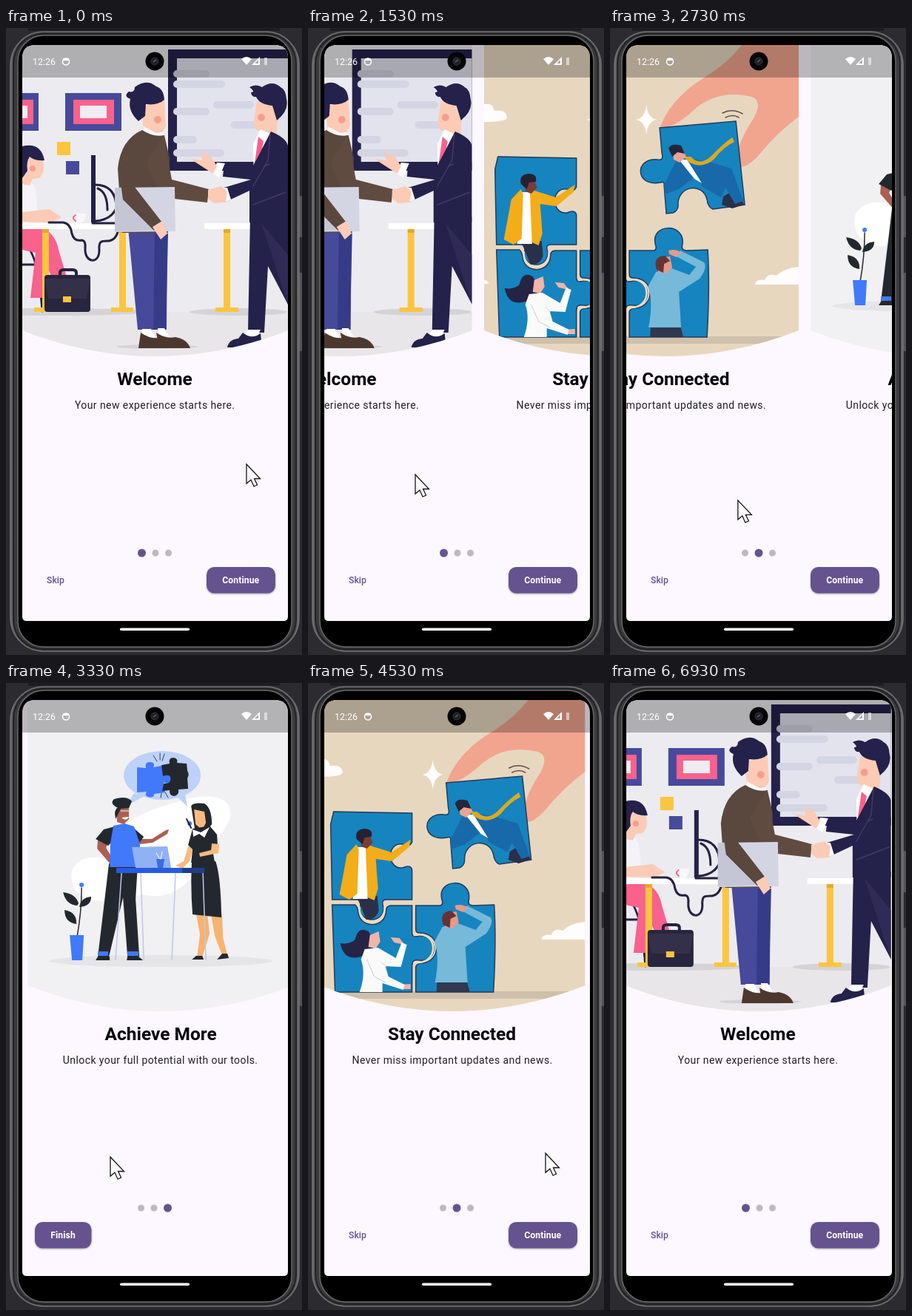
An HTML page that plays this animation: 400x848 px, repeating every 7 s.

```html
<!DOCTYPE html>
<html lang="en">
<head>
<meta charset="utf-8">
<title>Onboarding</title>
<style>
html, body { margin: 0; width: 100%; height: 100%; overflow: hidden; background: #2c2b30; }
svg { display: block; width: 100vw; height: 100vh; }
text { font-family: Roboto, Arial, sans-serif; }
.title { font-size: 24.45px; font-weight: 700; text-anchor: middle; fill: #050308; }
.body { font-size: 13.97px; letter-spacing: .44px; text-anchor: middle; fill: #211f26; }
.label { font-size: 12.2px; font-weight: 700; letter-spacing: .09px; text-anchor: middle; fill: #fff; }
.btn { fill: #65538f; filter: drop-shadow(0 1px 1px #0005); }
.navy { fill: #24214a; }
.skin { fill: #fbcbb6; }
.gold { fill: #fbc540; }
.blue { fill: #474a9a; }
.pink { fill: #f8628c; }
.piece { fill: #1684be; stroke: #203c5c; stroke-width: 1.5; }
.ink { fill: #23282f; }
.azure { fill: #4079fa; }
.line { fill: none; stroke-linecap: round; stroke-linejoin: round; }
</style>
</head>
<body>
<svg viewBox="0 0 400 848" preserveAspectRatio="none">
<defs>
  <clipPath id="screen"><path d="M22 41Q22 23 40 23H363Q381 23 381 41V796Q381 802 375 802H28Q22 802 22 796Z"/></clipPath>
  <clipPath id="curve"><path d="M22 23H381V409Q201.5 479 22 409Z"/></clipPath>
  <linearGradient id="metal"><stop stop-color="#6b6b6d"/><stop offset=".03" stop-color="#373739"/><stop offset=".97" stop-color="#373739"/><stop offset="1" stop-color="#6b6b6d"/></linearGradient>
</defs>

<!-- phone -->
<rect width="400" height="848" fill="#2c2b30"/>
<path d="M30 2H370" stroke="#1b1a1d" stroke-width="3"/>
<rect x="396" y="227" width="5" height="56" rx="2" fill="#555558"/>
<rect x="396" y="331" width="5" height="106" rx="2" fill="#555558"/>
<rect x="6" y="5" width="390" height="838" rx="45" fill="url(#metal)" stroke="#717174" stroke-width="1.5"/>
<rect x="10" y="8" width="382" height="832" rx="40" fill="#3b3b3d" stroke="#222224" stroke-width="2"/>
<rect x="16" y="10" width="370" height="827" rx="35" stroke="#68686a" stroke-width="1.5"/>

<g clip-path="url(#screen)">
  <rect x="22" y="23" width="359" height="779" fill="#fdf7ff"/>

  <!-- welcome -->
  <g class="page">
    <g clip-path="url(#curve)">
      <rect x="22" y="23" width="359" height="430" fill="#ecebef"/>
      <path d="M22 384H381V450H22Z" fill="#e8e6e9"/>
      <g fill="#d5d3d6"><ellipse cx="65" cy="384" rx="125" ry="5"/><ellipse cx="314" cy="384" rx="66" ry="5"/><ellipse cx="204" cy="431" rx="55" ry="3"/><ellipse cx="334" cy="430" rx="38" ry="3"/></g>
      <path class="navy" d="M219 29H390V193H219Z"/>
      <path d="M231 41H390V181H231Z" fill="#e2e3ed"/>
      <path class="line" d="M231 62H270M231 76H291M285 104H330M231 113H270M309 131H345M231 151H253M231 169H290" stroke="#d3d5e3" stroke-width="10"/>
      <path class="blue" d="M22 88H44V139H22ZM80 88H156V139H80Z"/>
      <path class="pink" d="M22 97H37V130H22ZM91 97H146V130H91Z"/>
      <path d="M22 105H29V122H22ZM100 105H136V122H100Z" fill="#efecf2"/>
      <path class="gold" d="M69 154H87V172H69Z"/>
      <path class="blue" d="M81 180H99V198H81Z"/>

      <path d="M22 292Q43 296 49 383M22 320H42" class="line" stroke="#25223f" stroke-width="3"/>
      <path class="pink" d="M22 272H53Q68 282 71 300L83 340 70 354 54 320 49 365H33L40 304 22 300Z"/>
      <path d="M22 205Q36 205 40 219L44 258 22 266Z" fill="#f5f3f8"/>
      <path class="skin" d="M24 172H48Q55 194 45 203L36 204 32 213 22 211ZM22 249L59 245 75 256 61 263 22 262Z"/>
      <circle cx="36" cy="190" r="4" fill="#f69e8e"/>
      <path class="navy" d="M22 160Q47 154 52 179Q38 180 32 174Q27 181 29 193L22 203Z"/>
      <path class="gold" d="M49 271H58V378H69V384H38V378H49ZM153 271H162V378H172V384H142V378H153ZM294 271H303V378H314V384H283V378H294Z"/>
      <path fill="#fff" d="M22 264H150V272H22ZM268 264H335V272H268Z"/>
      <path fill="#e6a72d" d="M49 272H58V277H49ZM153 272H162V277H153ZM294 272H303V277H294Z"/>
      <g class="line" stroke="#25223f" stroke-width="3">
        <path d="M120 212Q149 212 149 244Q141 260 121 261M124 217Q137 222 137 246M117 264H148"/>
        <path d="M58 263H77Q87 264 89 278Q92 289 102 287Q108 287 107 298C106 318 126 320 126 301C125 287 129 288 139 288Q150 286 152 271"/>
      </g>
      <path class="navy" d="M115 172H121V263H115Z"/>
      <path d="M94 251H108Q108 263 100 264H95Z" fill="#f9f7fa"/><path class="line" stroke="#f8628c" stroke-width="2" d="M94 253Q88 257 94 261"/>
      <path class="line" d="M73 336V331Q73 327 78 327H90Q95 327 95 331V336" stroke="#25223f" stroke-width="4"/>
      <rect x="52" y="334" width="62" height="50" rx="4" fill="#28253f"/><path d="M52 339H114L109 366H57Z" fill="#343049"/><path class="gold" d="M77 363H88V371H77Z"/>

      <path class="blue" d="M165 270H218L217 408H178Z"/><path d="M201 278H219L216 408H199Z" fill="#363b87"/>
      <path fill="#fff" d="M184 407H196L202 419 184 416ZM205 406H214L221 418 207 415Z"/>
      <g fill="#4d382f"><path d="M203 412Q216 421 229 418Q245 421 249 433H207Z"/><path d="M182 412Q195 421 207 419Q220 422 222 433H179Z"/></g>
      <path class="skin" d="M183 107L214 98 216 132Q213 142 207 142L208 149 187 151Z"/>
      <circle cx="205" cy="124" r="5" fill="#f69e8e"/>
      <path class="navy" d="M179 126Q164 112 168 96Q158 92 166 86Q174 88 174 80Q190 68 203 79Q213 82 214 97Q205 105 189 103L188 119Z"/>
      <path d="M186 133L203 142 213 141 216 153 185 147Z" fill="#f9f7fa"/>
      <path d="M184 138Q199 148 214 145L221 176 219 277H157L151 190Q155 151 184 138Z" fill="#5a473e"/>
      <path d="M213 145L224 205 274 218 272 236 210 229 190 182Z" fill="#604b41"/>
      <path d="M147 216L228 215 229 275 147 276Z" fill="#d4d5e2"/><path d="M147 216L173 215 199 273 147 275Z" fill="#c5c6d5"/>
      <path d="M152 188Q157 164 175 171L173 214 211 263 200 274 158 232Z" fill="#5a473e"/>
      <path class="skin" d="M198 269L211 261 218 278 209 286Z"/>

      <path class="navy" d="M330 255H381V374L354 322 349 412H327Z"/><path d="M345 264L381 307V374Z" fill="#302b56"/>
      <path d="M327 408H344L339 419H321Z" fill="#fff"/><path class="navy" d="M320 412Q332 422 344 413L346 432H299Q301 421 314 420Z"/>
      <path class="skin" d="M339 99L368 105 365 151 346 147V140Q334 139 335 127Z"/>
      <circle cx="345" cy="121" r="5" fill="#f69e8e"/>
      <path class="navy" d="M329 80Q338 75 346 80Q360 70 371 80Q378 83 379 96Q383 111 366 125L360 105Q342 103 338 93Q332 94 331 87Q338 87 329 80Z"/>
      <path d="M344 137L363 146 358 171 335 205 334 157Z" fill="#fff"/>
      <path class="pink" d="M341 147L348 153 342 186 334 197Z"/>
      <path class="navy" d="M358 140Q378 148 381 159V263H329V220L295 236 291 217 331 205 293 201 295 183 333 188 340 175Z"/>
      <path class="line" d="M357 144L354 179 334 214M349 187L356 184M334 239L378 222" stroke="#403b64" stroke-width="1.5"/>
      <path d="M285 182L296 183 288 202 279 196ZM291 216L299 216 304 232 295 236Z" fill="#fff"/>
      <path class="skin" d="M249 177L265 179 263 167 278 175 285 187 280 197ZM273 219L291 214 299 221 297 236 281 237 273 231Z"/>
    </g>
    <text class="title" x="201" y="482.5">Welcome</text>
    <text class="body" x="201.2" y="515">Your new experience starts here.</text>
  </g>

  <!-- stay connected -->
  <g class="page">
    <g clip-path="url(#curve)">
      <rect x="22" y="23" width="359" height="430" fill="#e8d7bf"/>
      <path d="M22 417H381V427H22Z" fill="#cfc0ab"/>
      <path d="M22 103Q35 101 36 112Q53 110 53 121Q53 127 22 127ZM322 347Q323 339 335 341Q339 330 351 335Q360 325 381 323V347ZM22 341Q29 342 28 346H22ZM175 104Q177 122 189 124Q177 126 175 144Q173 126 161 124Q173 122 175 104Z" fill="#fffdfb"/>
      <path d="M193 137C202 108 226 83 258 64Q285 47 304 23H381V120Q352 141 326 173Q309 191 300 187C294 168 305 145 320 122Q333 98 317 93Q270 82 237 113Q214 134 193 137Z" fill="#f1a58f"/>
      <path class="line" d="M278 115Q291 108 305 116M282 121Q292 116 300 121" stroke="#59504d" stroke-width="1.5"/>

      <path class="piece" d="M41 174L147 176V215Q145 221 138 219C113 210 111 252 134 250Q146 245 147 253V293H112Q105 293 108 302C112 326 73 326 77 302Q79 293 72 293H39L37 191Z"/>
      <path class="piece" d="M39 300H70Q73 302 74 308C75 333 112 333 112 307Q112 302 118 301H147V338Q147 345 157 342C183 340 183 378 157 375Q147 373 147 382V418H43Z"/>
      <path class="piece" d="M152 301H185Q190 300 187 292C181 264 227 263 224 292Q221 300 229 301L258 300Q261 349 257 418H152V384Q153 379 161 379C187 376 187 338 157 338Q152 338 152 333Z"/>
      <path class="piece" d="M193 135L296 126 308 239 265 245Q258 242 257 232C251 207 216 214 218 240Q218 247 211 250L202 251 199 213Q200 207 194 209C159 215 159 175 190 178Q199 180 196 169Z"/>
      <path class="line" d="M76 303C74 329 111 329 110 303M150 341C184 334 184 382 150 378" stroke="#ecdcc8" stroke-width="2.5"/>

      <path d="M72 288H100L102 308Q98 321 85 320Z" fill="#2a3049"/>
      <path d="M72 222H90L87 292H67Z" fill="#fff"/>
      <path d="M72 218L59 232 49 286 62 293 73 285 75 225ZM84 218L119 229 145 212 143 222 120 241 98 238 101 278 96 294 87 290Z" fill="#f3ad19"/>
      <path d="M78 207L90 206 94 216 86 224 78 221Z" fill="#793d35"/><path d="M72 211Q69 198 83 197Q95 198 92 208L83 209 80 218Z" fill="#252133"/>

      <path d="M88 336Q74 328 70 347Q63 354 50 352Q55 377 78 370Q95 366 96 350Z" fill="#252445"/>
      <path d="M90 341L102 336 104 350 98 359 88 357ZM123 351L118 344 130 345 137 354ZM132 408L145 407 145 414 132 414Z" fill="#f2b5a7"/>
      <path d="M83 360L101 358 125 372 133 351 140 354 132 384 111 383 115 397 137 408 135 415 107 406V418H76Q85 393 78 374Z" fill="#fbfafa"/>
      <path class="line" d="M86 374L96 397 111 405M106 378L112 384" stroke="#c9cdd4"/>

      <path d="M181 402H221L225 418H180Z" fill="#303750"/>
      <path d="M188 330L209 325 233 334 242 323 214 308 221 301 253 317Q258 324 247 339L219 357 222 405H178Q185 369 177 350Z" fill="#76b9d9"/>
      <path d="M193 311L207 309 210 324 202 332 191 330ZM205 301Q215 298 222 304L216 310 206 306Z" fill="#e69a88"/><path d="M189 327Q183 309 200 308L207 315 199 319 198 331Z" fill="#643434"/>

      <path d="M279 228L298 216 307 239 291 244 277 239Z" fill="#2a3049"/>
      <path d="M216 178L234 176 267 183 290 190 306 234 295 238 282 216 276 229 251 215 242 200 219 218 200 225 199 212Z" fill="#1769aa"/>
      <path d="M219 178L230 178 250 210 240 204Z" fill="#fff"/>
      <path d="M225 174L235 174Q248 188 264 172Q277 158 291 148L294 154Q279 161 267 177Q250 192 232 181Z" fill="#d9a925"/>
      <path d="M211 169L224 164 229 174 220 182 212 178Z" fill="#eda392"/><path d="M205 163Q208 155 222 159L227 170 217 168 210 174Z" fill="#25253e"/>
    </g>
    <text class="title" x="201" y="482.5">Stay Connected</text>
    <text class="body" x="201.5" y="515">Never miss important updates and news.</text>
  </g>

  <!-- achieve more -->
  <g class="page">
    <g clip-path="url(#curve)">
      <rect x="22" y="23" width="359" height="430" fill="#f1f0f2"/>
      <g transform="translate(-5 0)">
        <path d="M91 280C75 250 99 227 137 239C137 194 175 177 219 164C265 147 306 149 301 182C289 211 275 212 263 240C242 281 214 294 181 286C146 296 109 302 91 280Z" fill="#fff"/>
        <ellipse cx="207" cy="376" rx="151" ry="8" fill="#e5e4e7"/>
        <path d="M171 149L159 167 185 153ZM226 151L243 167 239 145Z" fill="#bed1f7"/><ellipse cx="209" cy="125" rx="52" ry="33" fill="#bed1f7"/>
        <path class="azure" d="M175 114L187 115Q185 106 193 107Q200 107 197 114L213 111 212 123Q224 122 221 132Q218 139 211 134L213 148 198 150Q198 156 190 154Q184 152 188 147L175 148Z"/>
        <path class="ink" d="M208 111L219 109Q217 101 224 101Q231 102 229 108L242 109 243 119Q246 123 243 129L244 143 231 144Q232 152 225 153Q218 152 219 145L209 146 211 136Q222 137 220 127Q218 123 210 126Z"/>
        <path class="line" d="M197 98L202 106M206 95V104M212 96L209 105M208 149L207 155M213 148L217 155" stroke="#31436b"/>

        <path class="line" d="M94 343Q100 309 100 277" stroke="#23282f" stroke-width="1.5"/>
        <path class="ink" d="M94 301Q79 300 75 283Q92 285 96 298ZM97 303Q99 290 113 289Q113 302 97 303ZM93 326Q77 324 77 307Q94 310 93 326Z"/><circle class="azure" cx="100" cy="273" r="3"/><path class="azure" d="M84 341H103L101 375H87Z"/>

        <path class="ink" d="M137 244H176L173 292 178 370H162L156 290 137 370H122Z"/>
        <path d="M136 363H122L122 369H136ZM162 363H177V369H162Z" fill="#4079fa"/>
        <path class="ink" d="M122 370H138V375H119ZM162 370H177L183 375H161Z"/>
        <path d="M147 169L164 167 164 184 157 191 148 188ZM122 211L137 213 133 223 143 239 139 245 121 224ZM176 211L195 211 214 199 218 198 216 204 196 216 178 218Z" fill="#a96053"/>
        <path class="ink" d="M145 194L130 198 119 211 136 220 146 209ZM169 195L184 208 175 220 165 213Z"/>
        <path class="azure" d="M143 193L158 190 171 194 179 218 177 249H138L139 216Z"/>
        <path class="ink" d="M146 184Q143 171 149 169Q137 163 144 157Q161 152 168 160L164 169 153 170Z"/><path d="M154 182Q160 188 164 181" fill="#fff"/><path class="line" d="M153 173H164" stroke="#fff"/>

        <path d="M255 313H270L273 339 263 371H256L260 340ZM275 313H290L291 344 297 368H290L280 342Z" fill="#f8b36d"/>
        <path class="ink" d="M255 369H263L265 374H249ZM290 366H297L299 372 283 374Z"/>
        <path class="ink" d="M248 166Q252 161 266 163Q276 169 276 191L269 200 253 197Z"/>
        <path d="M252 171L266 174 268 189 263 199 254 191ZM246 214L252 218 246 241 236 251 227 247 238 241Z" fill="#f8bb7f"/>
        <path class="ink" d="M250 197L273 193 283 205 284 222 277 226 280 243H248L250 225 244 219Z"/>
        <path d="M250 198L261 202 273 195 266 209 259 204 251 208Z" fill="#fff"/>
        <path d="M276 217L286 218 285 230 260 235 259 230 275 226Z" fill="#f8bb7f"/>
        <path class="ink" d="M249 241H281Q288 260 289 317L250 313Q247 276 249 241Z"/>
        <circle class="azure" cx="246" cy="190" r="3"/><path class="line" stroke="#23282f" stroke-width="2" d="M242 184L248 196"/>

        <path class="line" d="M154 257L146 374M180 257L184 374M227 257L222 374M264 257L268 374" stroke="#bdc9e4" stroke-width="1.5"/>
        <path d="M147 250H266V257H147Z" fill="#285be1"/><path d="M236 250H266V257H236Z" fill="#1e3e88"/>
        <path d="M168 222L216 221 221 250H173Z" fill="#91b1f5"/>
        <path d="M201 238H212L210 250H203Z" fill="#3a6de0"/><path class="line" d="M206 238L201 230M207 238L209 228" stroke="#fff"/>
      </g>
    </g>
    <text class="title" x="202" y="482.5">Achieve More</text>
    <text class="body" x="201.5" y="515">Unlock your full potential with our tools.</text>
  </g>

  <!-- status bar -->
  <rect x="22" y="23" width="359" height="44" opacity=".26"/>
  <text x="36" y="49.5" font-size="12.4" fill="#fff">12:26</text>
  <g fill="#fff"><path d="M318 42Q325 36 332 42L325 50ZM343 39V50H332Z"/><path d="M349 40H353V50H349Z" opacity=".55"/></g>
  <path d="M341 43V48H336Z" fill="#aaa7ac"/>
  <circle cx="81" cy="45.5" r="4.5" fill="none" stroke="#fff" stroke-width="1.5"/><path d="M77 41H85V44H77Z" fill="#fff"/>
  <circle cx="201" cy="45" r="12.5" fill="#050506"/><circle cx="201" cy="45" r="5" fill="#202126" stroke="#34353a"/><path d="M199 46L203 43" stroke="#62636c" stroke-width="1.5"/>

  <!-- controls -->
  <g id="dots"><circle cy="710"/><circle cy="710"/><circle cy="710"/></g>
  <g id="next">
    <text class="label" x="67" y="751" style="fill:#65538f;font-weight:500">Skip</text>
    <rect class="btn" x="271" y="729" width="93" height="35.5" rx="10.5"/>
    <text class="label" x="317.3" y="751">Continue</text>
  </g>
  <g id="finish">
    <rect class="btn" x="39" y="729" width="76.5" height="35.5" rx="10.5"/>
    <text class="label" x="77" y="751">Finish</text>
  </g>
</g>
<rect x="154" y="811.5" width="94" height="3.5" rx="1.7" fill="#fff"/>
<path id="cursor" d="M0 0V26L6 21 10 30 14.5 28 10.5 19.5H18.5Z" fill="#fff" stroke="#17151a" stroke-width="1.3"/>
</svg>

<script>
const LOOP = 7000, FPS = 15, STEP = 375;
const $ = id => document.getElementById(id);
const pages = [...document.querySelectorAll('.page')];
const dots = [...$('dots').children];

// Each swipe follows the pointer, then settles exponentially.
const swipes = [
  { from: 1150, release: 1453, dir: 1, share: .37, tau: 150 },
  { from: 2450, release: 2754, dir: 1, share: .42, tau: 150 },
  { from: 3650, release: 3954, dir: -1, share: .48, tau: 150 },
  { from: 6080, release: 6250, dir: -1, share: .4, tau: 117 }
];
// time, x, y
const pointer = [
  [0, 325, 590], [700, 278, 604], [1150, 278, 604], [1453, 145, 604],
  [1900, 145, 604], [2400, 300, 630], [2450, 300, 630], [2754, 141, 641],
  [3650, 141, 641], [3954, 321, 636], [4700, 321, 636], [5500, 155, 639],
  [6080, 155, 639], [6250, 300, 632], [LOOP, 310, 640]
];
const POINTER_GONE = 6800;

const smooth = p => p * p * (3 - 2 * p);

function swipeProgress(t, s) {
  if (t <= s.from) return 0;
  if (t < s.release) return s.share * smooth((t - s.from) / (s.release - s.from));
  return 1 - (1 - s.share) * Math.exp((s.release - t) / s.tau);
}

function pointerAt(t) {
  const i = pointer.findIndex(k => k[0] > t);
  const [a, b] = [pointer[i - 1], pointer[i]];
  const p = smooth((t - a[0]) / (b[0] - a[0]));
  return [1, 2].map(k => a[k] + (b[k] - a[k]) * p);
}

function draw(t) {
  const scroll = swipes.reduce((sum, s) => sum + s.dir * swipeProgress(t, s), 0);
  const current = Math.round(scroll);
  pages.forEach((page, i) =>
    page.setAttribute('transform', `translate(${((i - scroll) * STEP).toFixed(2)} 0)`));

  let left = 178;
  dots.forEach((dot, i) => {
    const r = i === current ? 5.5 : 4.5;
    dot.setAttribute('cx', left + r);
    dot.setAttribute('r', r);
    dot.setAttribute('fill', i === current ? '#65538f' : '#bdb8c1');
    left += 2 * r + 8.5;
  });
  $('next').style.display = current < 2 ? '' : 'none';
  $('finish').style.display = current < 2 ? 'none' : '';

  const [x, y] = pointerAt(t);
  $('cursor').setAttribute('transform', `translate(${x} ${y})`);
  $('cursor').style.display = t < POINTER_GONE ? '' : 'none';
}

const start = performance.now();
function tick() {
  const t = (performance.now() - start) % LOOP;
  draw(Math.floor(t * FPS / 1000) * 1000 / FPS);
  requestAnimationFrame(tick);
}
tick();
</script>
</body>
</html>
```
